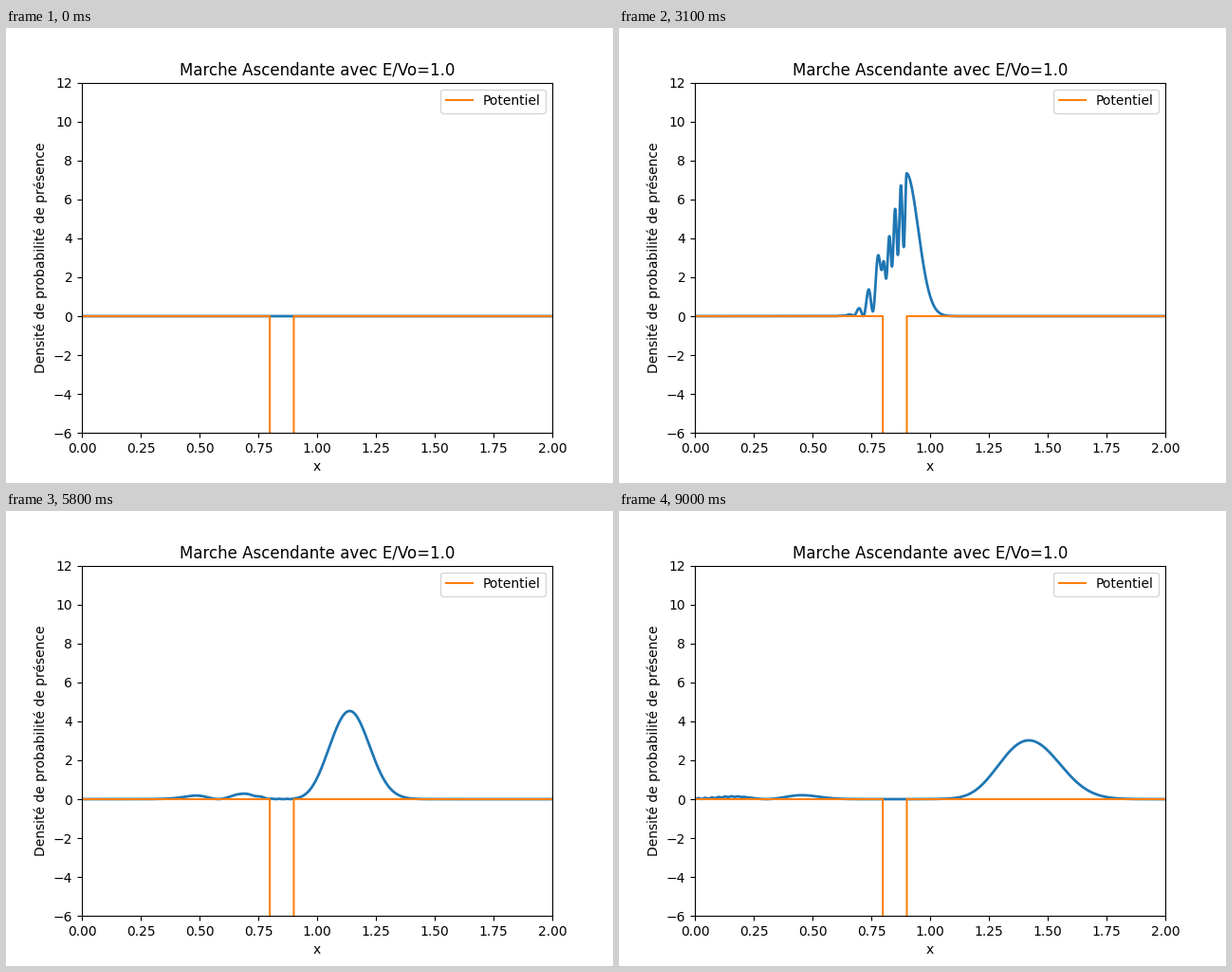
A matplotlib script for the animation above (9.1 s loop, 640 by 480 pixels).

```python
import numpy as np
import matplotlib.pyplot as plt
from matplotlib.animation import FuncAnimation

# Grid and time step
dx, dt = 1e-3, 1e-7
nx = 2000
s = dt / dx**2
frames, steps_per_frame = 91, 1000

# Gaussian wave packet heading for a square well
ratio, v0 = 1.0, -4000
xc, sigma = 0.6, 0.05
k = np.sqrt(2 * abs(ratio * v0))
x = np.linspace(0, (nx - 1) * dx, nx)
V = np.where((x >= 0.8) & (x <= 0.9), v0, 0.0)


def simulate():
    """Leapfrog the real and imaginary parts, sampling |psi|^2 per frame."""
    amp = 1 / np.sqrt(sigma * np.sqrt(np.pi))
    psi = amp * np.exp(1j * k * x - (x - xc) ** 2 / (2 * sigma**2))
    re, im = psi.real.copy(), psi.imag.copy()
    diag = 2 * (s + V[1:-1] * dt)
    density = np.zeros((frames, nx))
    for i in range(1, (frames - 2) * steps_per_frame + 2):
        if i % 2:
            old = im[1:-1].copy()
            im[1:-1] += s * (re[2:] + re[:-2]) - diag * re[1:-1]
            if (i - 1) % steps_per_frame == 0:
                row = (i - 1) // steps_per_frame + 1
                density[row, 1:-1] = re[1:-1] ** 2 + im[1:-1] * old
        else:
            re[1:-1] += diag * im[1:-1] - s * (im[2:] + im[:-2])
    return density


density = simulate()

fig, ax = plt.subplots(figsize=(6.4, 4.8), dpi=100)
wave, = ax.plot(x, density[0], lw=2)
ax.plot(x, V, label="Potentiel")
ax.set_xlim(0, 2)
ax.set_ylim(-6, 12)
ax.set_title(f"Marche Ascendante avec E/Vo={ratio}")
ax.set_xlabel("x")
ax.set_ylabel("Densité de probabilité de présence")
ax.legend(loc="upper right")


def update(n):
    wave.set_ydata(density[n])
    return wave,


anim = FuncAnimation(fig, update, frames=frames, interval=100,
                     repeat=True, repeat_delay=0)
plt.show()
```
